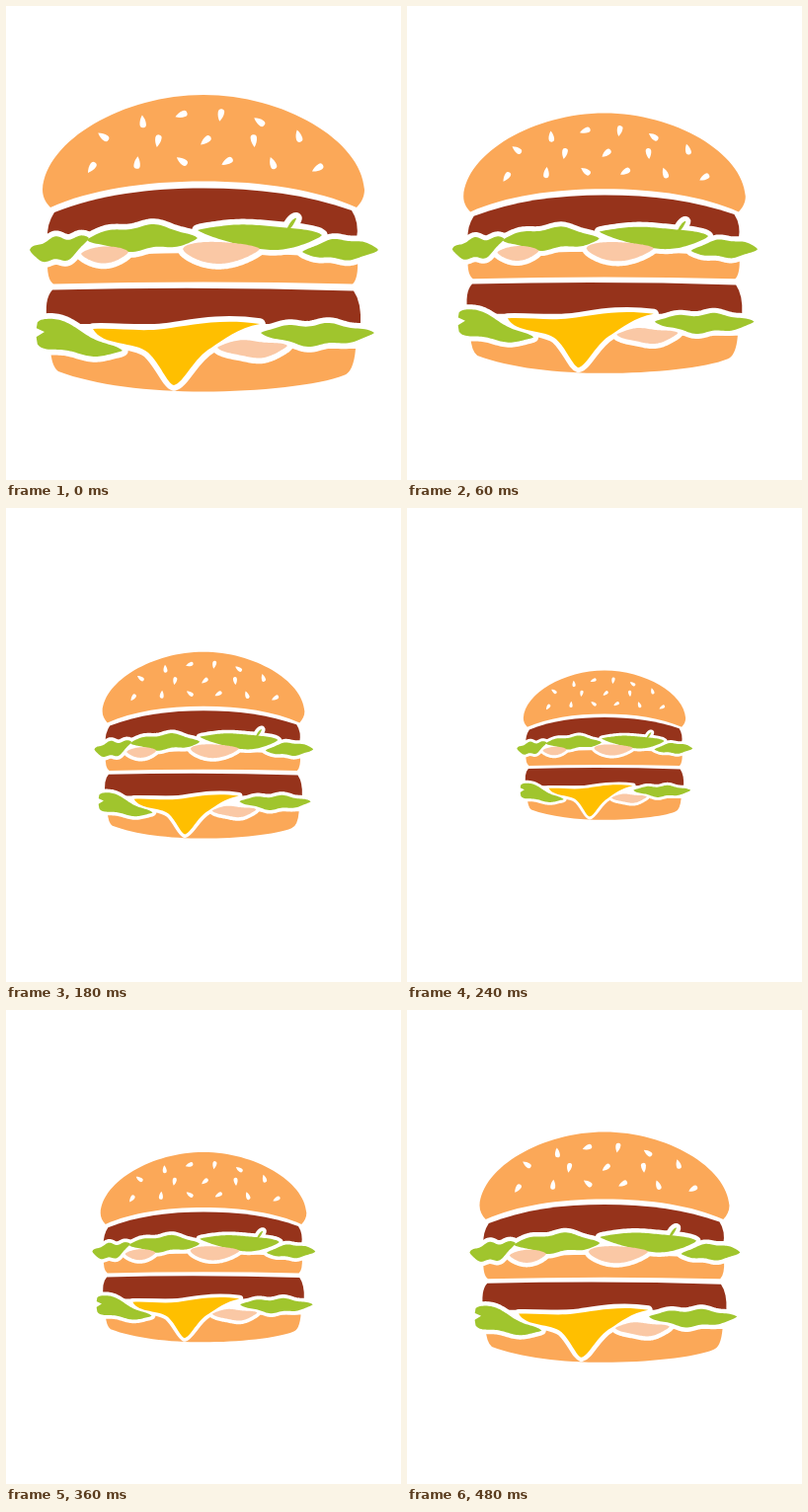
These frames come from a looping animation (400x480 px, 510 ms). An HTML page:

```html
<!DOCTYPE html>
<html lang="en">
<head>
<meta charset="utf-8">
<title>Pulsing burger</title>
<style>
  html, body { margin: 0; height: 100%; overflow: hidden; background: #fff; }
  svg { display: block; width: 100vw; height: 100vh; }
</style>
</head>
<body>
<svg viewBox="0 0 400 480">
  <g id="burger">
    <g fill="#fba858">
      <path d="M45 204C40 199 37 193 37 186C40 136 119 90 200 90S360 136 363 186C363 193 360 199 355 204C315 186 260 177.500 200 177.500S85 186 45 204Z"/>
      <path d="M42 256Q41 277 48 281.500Q200 277.500 351 281.500Q357 276 356 256Q200 244 42 256Z"/>
      <path d="M45 347Q46 365 53 370C90 384 145 390.500 200 390.500S318 384 342 374Q352 371 354 347Z"/>
    </g>
    <g fill="#96331b">
      <path d="M49 209C95 191 145 184.500 200 184.500S305 191 350 207Q358 219 355 236H42Q41 221 49 209Z"/>
      <path d="M47 287.500Q200 283.500 352 288.500Q360 300 359 322H42Q38 297 47 287.500Z"/>
    </g>
    <g id="gaps" fill="#fff" stroke="#fff" stroke-width="11.500" stroke-linejoin="round"></g>
    <g id="fillings"></g>
    <path d="M26 324L39 330L26 338Z" fill="#fff"/>
    <g id="seeds" fill="#fff"></g>
  </g>
</svg>
<script>
const GREEN = '#a0c52d', PINK = '#fac8a5', CHEESE = '#ffbf00';
const byId = id => document.getElementById(id);

function addPath(parent, attributes) {
  const path = document.createElementNS('http://www.w3.org/2000/svg', 'path');
  for (const name in attributes) path.setAttribute(name, attributes[name]);
  byId(parent).append(path);
}

function filling(fill, d) {
  addPath('gaps', { d });
  addPath('fillings', { d, fill });
}

// A wavy ribbon between two tips; skew below 1 moves its widest part to the left.
function leaf(fill, [x1, y1], [x2, y2], { half, bulge = 0, wave = 0, cycles = 1, phase = 0, skew = 1 }) {
  const SAMPLES = 48, top = [], bottom = [];
  for (let i = 0; i <= SAMPLES; i++) {
    const t = i / SAMPLES;
    const ripple = wave * Math.sin(2 * Math.PI * (cycles * t + phase));
    const x = x1 + (x2 - x1) * t;
    const y = y1 + (y2 - y1) * t + (bulge + ripple) * Math.sin(Math.PI * t);
    const h = half * Math.max(0, Math.sin(Math.PI * t ** skew)) ** 0.7;
    top.push([x, y - h]);
    bottom.unshift([x, y + h]);
  }
  filling(fill, `M${top.concat(bottom).join('L')}Z`);
}

// Upper layer
leaf(GREEN, [24, 247], [84, 235], { half: 11.5, bulge: 6, wave: 3, cycles: 2, phase: -0.1, skew: 0.9 });
leaf(GREEN, [82, 237], [194, 235], { half: 12, bulge: -1, wave: 2.5, cycles: 2, phase: 0.5 });
leaf(GREEN, [194, 227], [320, 232], { half: 12, bulge: 4.5, wave: -1.5, skew: 1.15 });
leaf(GREEN, [284, 227], [294, 215], { half: 3 });
leaf(GREEN, [300, 249], [377, 247], { half: 10, bulge: -1.5, wave: 1.5, cycles: 2, skew: 1.1 });
leaf(PINK, [76, 251], [124, 249], { half: 8.5, bulge: 2 });
leaf(PINK, [179, 246], [257, 246], { half: 11, bulge: 4, skew: 0.85 });

// Lower layer
leaf(GREEN, [30, 331], [118, 349], { half: 15.5, wave: -4, skew: 0.4 });
filling(CHEESE, 'M88 327C115 326 135 330 160 327S215 316 257 322C235 326 220 338 208 346C190 356 180 382 170 384C163 382 156 362 144 351C130 339 98 345 88 327Z');
leaf(PINK, [214, 346], [285, 344], { half: 8.5, bulge: 2.5, wave: -2 });
leaf(GREEN, [258, 331], [373, 331], { half: 10.5, bulge: 2, wave: 2, cycles: 2.5, phase: -0.77 });

// Rows of sesame seeds on a bun-shaped arc, one tip direction per seed
function seedRow(left, gap, top, sag, angles) {
  angles.forEach((angle, i) => {
    const x = left + gap * i, y = top + sag * (x - 198) ** 2;
    addPath('seeds', {
      d: 'M0-7C2-4 3.200-1 3.200 2.500A3.200 3.200 0 0 1-3.200 2.500C-3.200-1-2-4 0-7Z',
      transform: `translate(${x} ${y}) rotate(${angle})`
    });
  });
}
seedRow(99, 39.5, 109, 0.0024, [-55, -5, 250, 190, -55, -15]);
seedRow(154, 48.5, 136, 0, [190, 230, 175]);
seedRow(87, 45.8, 157, 0.0005, [215, 5, -55, 240, -20, 240]);

const STEP = 30, STEPS = 17, TURN = 8;

function draw() {
  const step = Math.floor(performance.now() / STEP) % STEPS;
  const scale = step <= TURN ? 1 - 0.062 * step : 0.504 + 0.034 * (step - TURN);
  byId('burger').setAttribute('transform', `translate(200 240) scale(${scale}) translate(-200 -240)`);
  requestAnimationFrame(draw);
}
draw();
</script>
</body>
</html>
```
